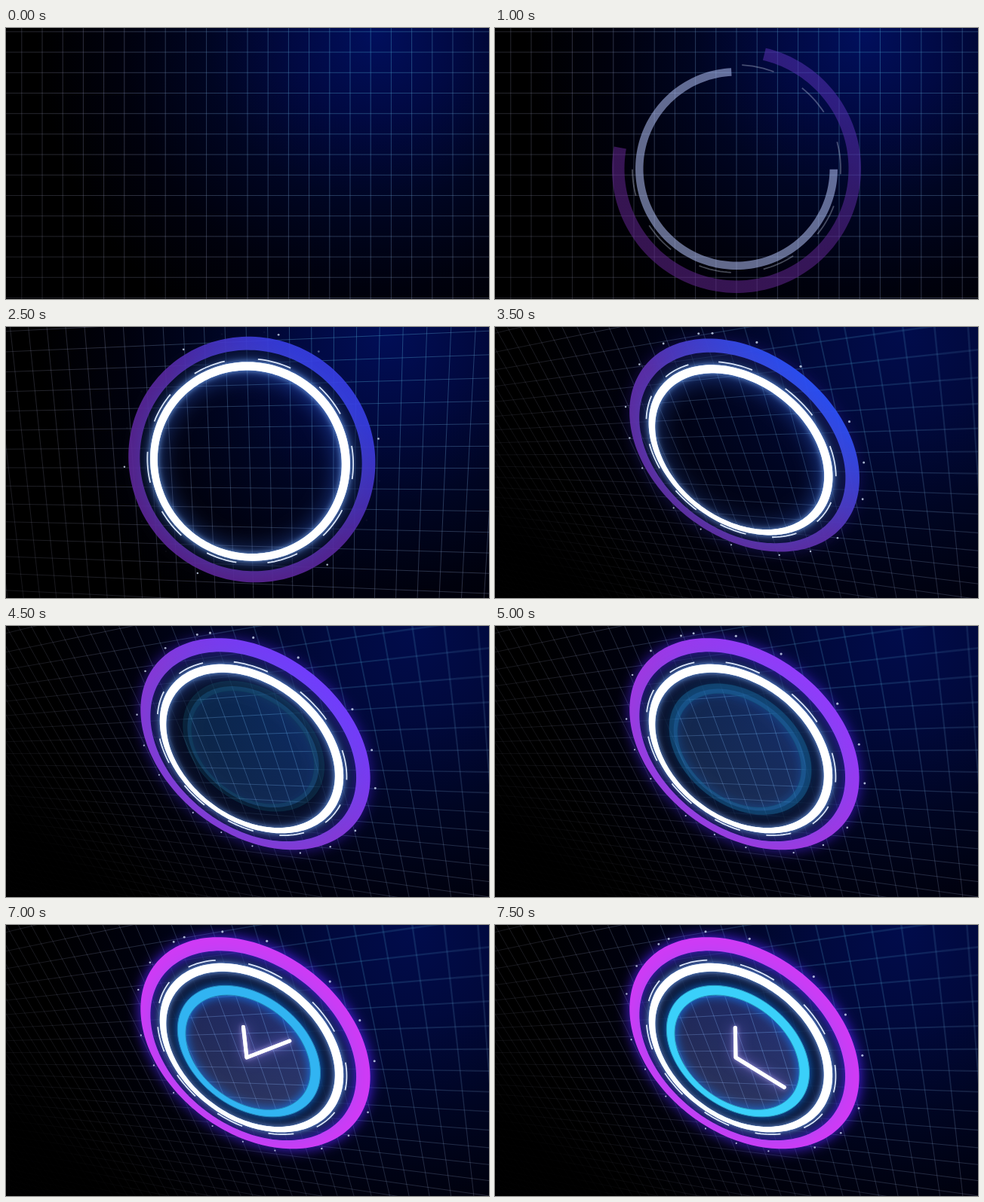
An HTML page with a canvas that plays this animation: 640x360 px, repeating every 8 s.

```html
<!DOCTYPE html>
<html lang="en">
<head>
<meta charset="utf-8">
<title>Neon clock</title>
<style>
html, body { margin: 0; width: 100%; height: 100%; overflow: hidden; background: #000; }
canvas { display: block; width: 640px; height: 360px; }
</style>
</head>
<body>
<canvas id="stage" width="640" height="360"></canvas>
<script>
const W = 640, H = 360, LOOP = 8000, STEP = 500;
const DEG = Math.PI / 180, DEPTH = 628, CELL = 27.2, GRID_SINK = 26;
const ctx = document.getElementById('stage').getContext('2d');

const mix = (a, b, k) => a + (b - a) * k;
const ramp = (t, a, b) => Math.min(1, Math.max(0, (t - a) / (b - a)));
const smooth = x => x * x * (3 - 2 * x);
const inOut = x => x < 0.5 ? 4 * x ** 3 : 1 - 4 * (1 - x) ** 3;
const rgba = (c, a = 1) => `rgba(${c.map(Math.round).join(',')},${a})`;

// Piecewise linear value from [time, channel, channel, ...] stops.
function keyed(t, stops) {
  let i = 0;
  while (i < stops.length - 2 && t > stops[i + 1][0]) i++;
  const [t0, ...a] = stops[i], [t1, ...b] = stops[i + 1];
  return a.map((v, n) => mix(v, b[n], ramp(t, t0, t1)));
}

let cam;
function setCamera(p) {
  const a = 34.4 * DEG * p, b = 32.5 * DEG * p;
  const sa = Math.sin(a), ca = Math.cos(a), sb = Math.sin(b), cb = Math.cos(b);
  cam = {
    x: 320 - 3.5 * p, y: 187 - 12.5 * p, s: 1 + 0.006 * p,
    e1: [cb, 0, -sb], e2: [sb * sa, ca, cb * sa], n: [sb * ca, -sa, cb * ca]
  };
}

function project(u, v, h = 0) {
  const [x, y, z] = [0, 1, 2].map(i => u * cam.e1[i] + v * cam.e2[i] + h * cam.n[i]);
  const w = 1 + z / DEPTH;
  return [cam.x + cam.s * x / w, cam.y + cam.s * y / w, w];
}

// Angles run clockwise from twelve o'clock.
const polar = (r, deg, h) => project(r * Math.sin(deg * DEG), -r * Math.cos(deg * DEG), h);

function arcPoints(r, a0, a1, h) {
  const n = Math.max(4, Math.ceil(Math.abs(a1 - a0) / 2));
  return Array.from({ length: n + 1 }, (_, i) => polar(r, mix(a0, a1, i / n), h));
}

function addLine(points) {
  points.forEach(([x, y], i) => i ? ctx.lineTo(x, y) : ctx.moveTo(x, y));
}

function ringPath(r0, r1, a0 = 0, a1 = 360, h = 0) {
  ctx.beginPath();
  const outer = arcPoints(r1, a0, a1, h), inner = arcPoints(r0, a1, a0, h);
  if (a1 - a0 >= 360) {
    addLine(outer);
    ctx.closePath();
    addLine(inner);
  } else {
    addLine(outer.concat(inner));
  }
  ctx.closePath();
}

function glow(color, blur) {
  ctx.shadowColor = color;
  ctx.shadowBlur = blur;
}

function layer(draw) {
  ctx.save();
  draw();
  ctx.restore();
}

function drawBackdrop(p) {
  const cx = mix(490, 540, p), cy = mix(8, 5, p);
  const g = ctx.createRadialGradient(cx, cy, 0, cx, cy, mix(450, 490, p));
  g.addColorStop(0, rgba([1, mix(15, 12, p), mix(92, 76, p)]));
  g.addColorStop(0.25, rgba([1, 9, mix(66, 60, p)]));
  g.addColorStop(0.5, 'rgb(0,5,34)');
  g.addColorStop(0.75, 'rgb(0,1,13)');
  g.addColorStop(1, '#000');
  ctx.fillStyle = g;
  ctx.fillRect(0, 0, W, H);
}

function drawGrid(p) {
  const g = ctx.createRadialGradient(480, 30, 0, 480, 30, 560);
  g.addColorStop(0, 'rgba(60,150,195,.46)');
  g.addColorStop(0.35, 'rgba(90,135,180,.42)');
  g.addColorStop(0.65, 'rgba(130,135,165,.36)');
  g.addColorStop(1, 'rgba(125,125,150,.24)');
  const span = p ? 1300 : 400, seg = p ? 65 : 800;
  const visible = ([x, y]) => x > -120 && x < W + 120 && y > -120 && y < H + 120;
  const dim = mix(1, 0.8, p);
  function line(at) {
    for (let k = -span; k < span; k += seg) {
      const a = at(k), b = at(k + seg);
      if (a[2] < 0.25 || b[2] < 0.25) continue;
      if (p && !visible(a) && !visible(b)) continue;
      const w = (a[2] + b[2]) / 2;
      const soft = Math.max(1, 1 + (0.92 - w) * 8);
      ctx.lineWidth = soft;
      ctx.globalAlpha = dim * (w < 1 ? soft ** -0.75 : Math.max(0.05, 1.05 - w * w * 0.05 - (w - 1)));
      ctx.beginPath();
      addLine([a, b]);
      ctx.stroke();
    }
  }
  layer(() => {
    ctx.strokeStyle = g;
    // The grid lies behind the rings, so it is enlarged to keep its spacing when flat.
    const big = 1 + GRID_SINK / DEPTH, cell = CELL * big;
    const n = Math.ceil(span / cell);
    for (let i = -n; i <= n; i++) {
      line(k => project(i * cell, k, GRID_SINK));
      line(k => project(k, 8.3 * big + i * cell, GRID_SINK));
    }
  });
}

function drawShade(t) {
  layer(() => {
    ctx.filter = 'blur(4px)';
    ctx.fillStyle = rgba([0, 0, 8], 0.5 * ramp(t, 1200, 2500));
    ringPath(132, 150);
    ctx.fill('evenodd');
    ctx.fillStyle = rgba([0, 0, 5], 0.8 * ramp(t, 3900, 4700));
    ringPath(98, 127);
    ctx.fill('evenodd');
  });
}

function drawPurple(t, trim) {
  const low = keyed(t, [[1000, 96, 36, 140], [2500, 92, 36, 150], [3500, 98, 43, 160],
    [4500, 134, 55, 210], [6000, 207, 58, 246]]);
  const high = keyed(t, [[1000, 82, 46, 175], [2500, 56, 62, 230], [3500, 40, 80, 248],
    [4500, 112, 60, 255], [6000, 207, 58, 246]]);
  const g = ctx.createLinearGradient(240, 240, 410, 60);
  g.addColorStop(0, rgba(low));
  g.addColorStop(0.45, rgba(low.map((v, i) => mix(v, high[i], 0.12))));
  g.addColorStop(1, rgba(high));
  layer(() => {
    ctx.globalAlpha = keyed(t, [[0, 0], [1000, 0.56], [2500, 0.9], [4500, 1]])[0];
    ctx.fillStyle = g;
    const lit = ramp(t, 2800, 6000);
    if (lit) glow(rgba([85, 35, 255], lit), 18);
    ringPath(148.5, 165, 13.6, 13.6 + 360 * trim);
    ctx.fill('evenodd');
  });
}

function drawWhite(t, p, trim) {
  const lit = ramp(t, 1000, 2300);
  layer(() => {
    ctx.globalAlpha = keyed(t, [[0, 0], [1000, 0.56], [2000, 1]])[0];
    ctx.fillStyle = rgba(keyed(t, [[1000, 175, 190, 240], [2200, 255, 255, 255]]));
    ringPath(123.5 - p, 134 - p, 357 - 360 * trim, 357);
    if (lit) {
      glow(rgba([55, 110, 235], lit), 30);
      ctx.fill('evenodd');
      glow(rgba([120, 170, 245], lit), 9);
    }
    ctx.fill('evenodd');
  });
}

function drawDashes(t, p, trim) {
  const turn = 3 + (t - 1000) * 0.0031;
  layer(() => {
    ctx.strokeStyle = '#e4efff';
    ctx.globalAlpha = keyed(t, [[0, 0], [1000, 0.3], [2200, 0.95]])[0];
    ctx.lineWidth = 1.8;
    for (let i = 0; i < 10; i++) {
      const a = i * 36, b = Math.min(a + 18, 360 * trim);
      if (b <= a) continue;
      ctx.beginPath();
      addLine(arcPoints(138 - p, turn + a, turn + b));
      ctx.stroke();
    }
  });
}

function drawDots(t) {
  const turn = 10.1 - (t - 3500) * 0.0051;
  const first = ramp(t, 1900, 2400), rest = ramp(t, 2450, 3300);
  layer(() => {
    ctx.fillStyle = '#dcebff';
    for (let i = 0; i < 18; i++) {
      const group = Math.floor(i / 3), k = i % 3;
      const [x, y, w] = polar(171.5, turn + group * 63.5 + k * 18.2);
      ctx.globalAlpha = 0.75 * (k ? (i === 1 ? Math.max(rest, first * 0.5) : rest) : first);
      ctx.beginPath();
      ctx.arc(x, y, 1.3 / w, 0, 7);
      ctx.fill();
    }
  });
}

function drawDisc(t) {
  const show = ramp(t, 4000, 5500);
  if (!show) return;
  const sink = 16 * (1 - smooth(ramp(t, 4200, 5700)));
  layer(() => {
    ctx.globalCompositeOperation = 'lighter';
    const g = ctx.createLinearGradient(300, 80, 340, 255);
    g.addColorStop(0, rgba(keyed(t, [[4500, 10, 34, 48], [6000, 30, 36, 66]])));
    g.addColorStop(1, rgba(keyed(t, [[4500, 16, 36, 56], [6000, 44, 50, 72]])));
    ctx.globalAlpha = ramp(t, 4000, 4500);
    ctx.fillStyle = g;
    ctx.beginPath();
    addLine(arcPoints(97, 0, 360, sink));
    ctx.fill();
  });
  layer(() => {
    const rim = keyed(t, [[4500, 24, 100, 125], [6000, 32, 125, 226], [7500, 58, 208, 250]]);
    ctx.globalAlpha = keyed(t, [[4000, 0], [4500, 0.25], [6000, 0.88], [7000, 1]])[0];
    ctx.fillStyle = rgba(rim);
    glow(rgba([20, 130, 255], show), 14);
    ringPath(91, 104, 0, 360, sink);
    ctx.fill('evenodd');
    ctx.shadowBlur = 0;
    ctx.strokeStyle = rgba(rim.map(v => v * 0.75));
    ctx.lineWidth = 1;
    ctx.stroke();
  });
}

function drawHands(t) {
  const grow = 1 - (1 - ramp(t, 5250, 6650)) ** 3;
  if (!grow) return;
  const dt = t - 6000;
  layer(() => {
    ctx.translate(2.5, 1.5);
    ctx.strokeStyle = '#fff';
    ctx.lineWidth = 5;
    ctx.lineCap = ctx.lineJoin = 'round';
    ctx.beginPath();
    addLine([
      polar(74.5 * grow, 314 + dt * 175.3 / 1500),
      project(0, 0),
      polar(48 * grow, 4.4 + dt * 14.5 / 1500)
    ]);
    glow('rgba(150,130,255,.9)', 18);
    ctx.stroke();
    glow('rgba(190,180,255,.8)', 6);
    ctx.stroke();
  });
}

function draw(t) {
  const p = inOut(ramp(t, 1500, 3900));
  const trim = smooth(ramp(t, 0, 1500));
  setCamera(p);
  ctx.clearRect(0, 0, W, H);
  drawBackdrop(p);
  drawGrid(p);
  if (!trim) return;
  drawShade(t);
  drawPurple(t, trim);
  drawWhite(t, p, trim);
  drawDashes(t, p, trim);
  drawDots(t);
  drawDisc(t);
  drawHands(t);
}

// The picture holds for half a second at a time.
let last = -1;
const start = performance.now();
function tick() {
  const t = Math.floor(((performance.now() - start) % LOOP) / STEP) * STEP;
  if (t !== last) draw(last = t);
  requestAnimationFrame(tick);
}
tick();
</script>
</body>
</html>
```
